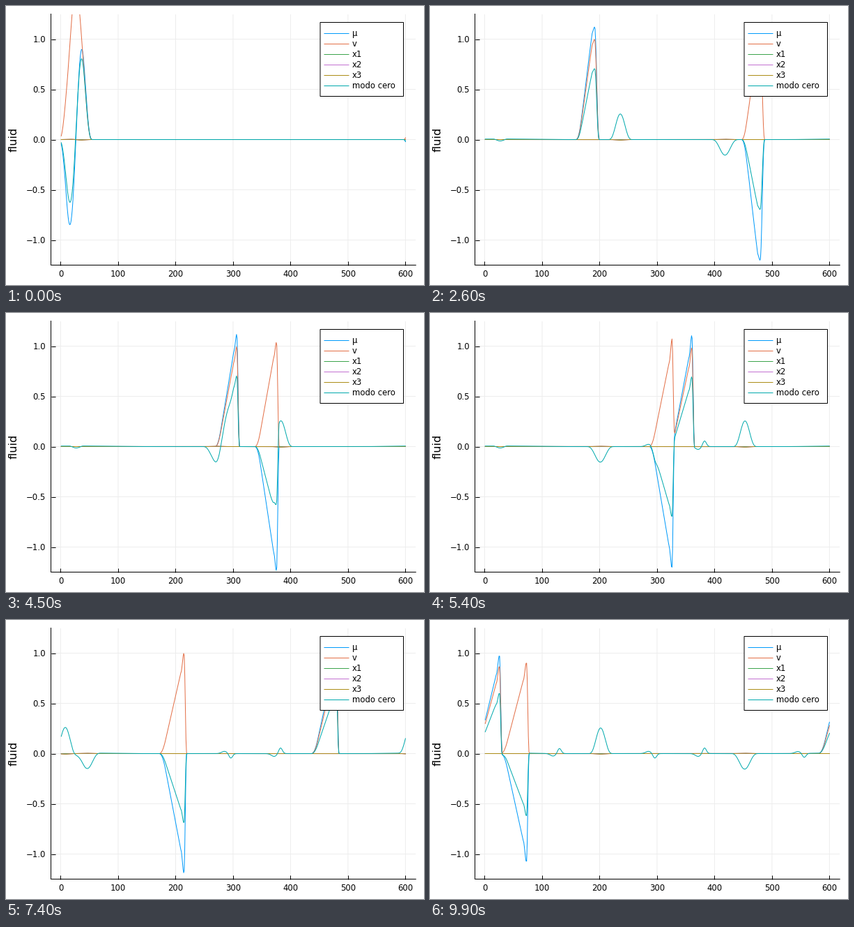
Write a matplotlib script that moves like this. It is 600 px wide and 400 px high and loops after 10000 ms.

```python
import numpy as np
import matplotlib.pyplot as plt
from matplotlib.animation import FuncAnimation
from matplotlib.patches import Rectangle

W, H, DPI = 600, 400, 100
FRAMES, STEP = 100, 100
LOOP = FRAMES * STEP / 1000
N = 600
x = np.arange(1, N + 1)

plt.rcParams["font.family"] = "DejaVu Sans"
plt.rcParams["path.snap"] = False
PIXEL = 72 / DPI
SERIES = {"μ": "#009afa", "v": "#e36f47", "x1": "#3da44d",
          "x2": "#c271d2", "x3": "#ac8d18", "modo cero": "#00a9ad"}

# Crossings of slow waves and pulses: place, time, strength
CROSSINGS = [(293, 4.25, -0.8), (379.5, 4.45, 1), (553, 8.6, -0.7), (127, 8.95, 0.9)]


def smooth(u):
    u = np.clip(u, 0, 1)
    return u * u * (3 - 2 * u)


def bump(d, half, power=3):
    return np.clip(1 - (d / half) ** 2, 0, None) ** power


def gauss(d, width):
    return np.exp(-(d / width) ** 2)


def offset(centre):
    """Signed distance to a centre on the periodic domain."""
    return (x - centre + N / 2) % N - N / 2


def ramp(u, shoulder, edge=0.87, foot=0.25):
    """Rounded foot, straight slope, then a step up to the crest."""
    slope = np.where(u < foot, u * u / (2 * foot), u - foot / 2)
    slope = slope * shoulder / (edge - foot / 2)
    top = shoulder + (1 - shoulder) * smooth((u - edge) / (1 - edge))
    return np.where(u < edge, slope, top)


def pulse(t, start, speed, decay, gain):
    """A smooth bump that steepens into a sawtooth, steep on its right."""
    long = 24 + 20.5 * np.sin(np.pi / 2 * t / LOOP)
    steep = 5 + 17 * np.exp(-(t / 2) ** 2)
    height = 1.095 - decay * t + gain * np.sin(np.pi * t / LOOP)
    shoulder = 0.95 - 0.15 * smooth((t - 3) / 2.5)

    d = offset(start + speed * t + long)
    rise = np.clip(1 + d / long, 0, 1)
    age = smooth(t / 3.5)
    front = (1 - age) * bump(1 - rise, 1) + age * ramp(rise, shoulder)
    return height * np.where(d < 0, front, bump(d, steep))


def ripples(t):
    """Small standing marks left by the start and by each crossing."""
    y = smooth(2 * t - 1) * (0.006 * bump(offset(30), 110, 2)
                             - 0.02 * bump(offset(27), 12, 2))
    for place, time, gain in CROSSINGS:
        d = offset(place)
        shape = 0.058 * gauss(d - 3, 4.5) - 0.028 * gauss(d + 8, 7)
        y = y + gain * smooth(2 * (t - time)) * shape
    return y


def fields(t):
    r = pulse(t, 9, 57.8, 0.012, 0.08)
    l = pulse(t, 596.5, -57.4, 0.002, 0.155)
    wave = (0.255 * bump(offset(34.5 + 77.5 * t), 22, 4)
            - 0.155 * bump(offset(19.7 - 77.5 * t), 25, 4))
    modo = 0.63 * r - 0.58 * l + wave + ripples(t)
    return [r - l, 0.89 * r + 0.84 * l, 0 * wave, -0.02 * wave, -0.022 * wave, modo]


fig = plt.figure(figsize=(W / DPI, H / DPI), dpi=DPI, facecolor="white")
L, R, T, B = 64.5, 588.2, 11.5, 371.5
ax = fig.add_axes([L / W, 1 - B / H, (R - L) / W, (B - T) / H])
ax.set_xlim(-16.97, 617.97)
ax.set_ylim(-1.25, 1.25)
ax.set_xticks(range(0, N + 1, 100))
ax.set_yticks(np.arange(-1, 1.1, 0.5))
ax.yaxis.set_major_formatter("{x:.1f}")
ax.grid(color="#ededed", lw=PIXEL)
ax.set_axisbelow(True)
ax.tick_params(direction="in", length=4, width=PIXEL, labelsize=8.4)
ax.tick_params(axis="x", pad=4.5)
ax.tick_params(axis="y", pad=5.3)
ax.spines[["top", "right"]].set_visible(False)
ax.spines[["left", "bottom"]].set_linewidth(PIXEL)
lines = [ax.plot(x, 0 * x, color=c, lw=PIXEL)[0] for c in SERIES.values()]

# Overlay in pixel units for the axis title and the legend
over = fig.add_axes([0, 0, 1, 1], zorder=3)
over.set_xlim(0, W)
over.set_ylim(H, 0)
over.axis("off")
over.text(18.5, 191, "fluid", rotation=90, size=11.6, ha="right", va="center")
over.add_patch(Rectangle((451, 23.5), 119.5, 106, fc="white", ec="black", lw=PIXEL))
for i, (name, color) in enumerate(SERIES.items()):
    y = 39.5 + 15 * i
    over.plot([457, 492], [y, y], color=color, lw=PIXEL)
    over.text(497, y + 3.6, name, size=8.4, va="baseline")


def draw(i):
    for line, y in zip(lines, fields(i * STEP / 1000)):
        line.set_ydata(y)
    return lines


anim = FuncAnimation(fig, draw, frames=FRAMES, interval=STEP,
                     repeat=True, repeat_delay=0)
plt.show()
```
